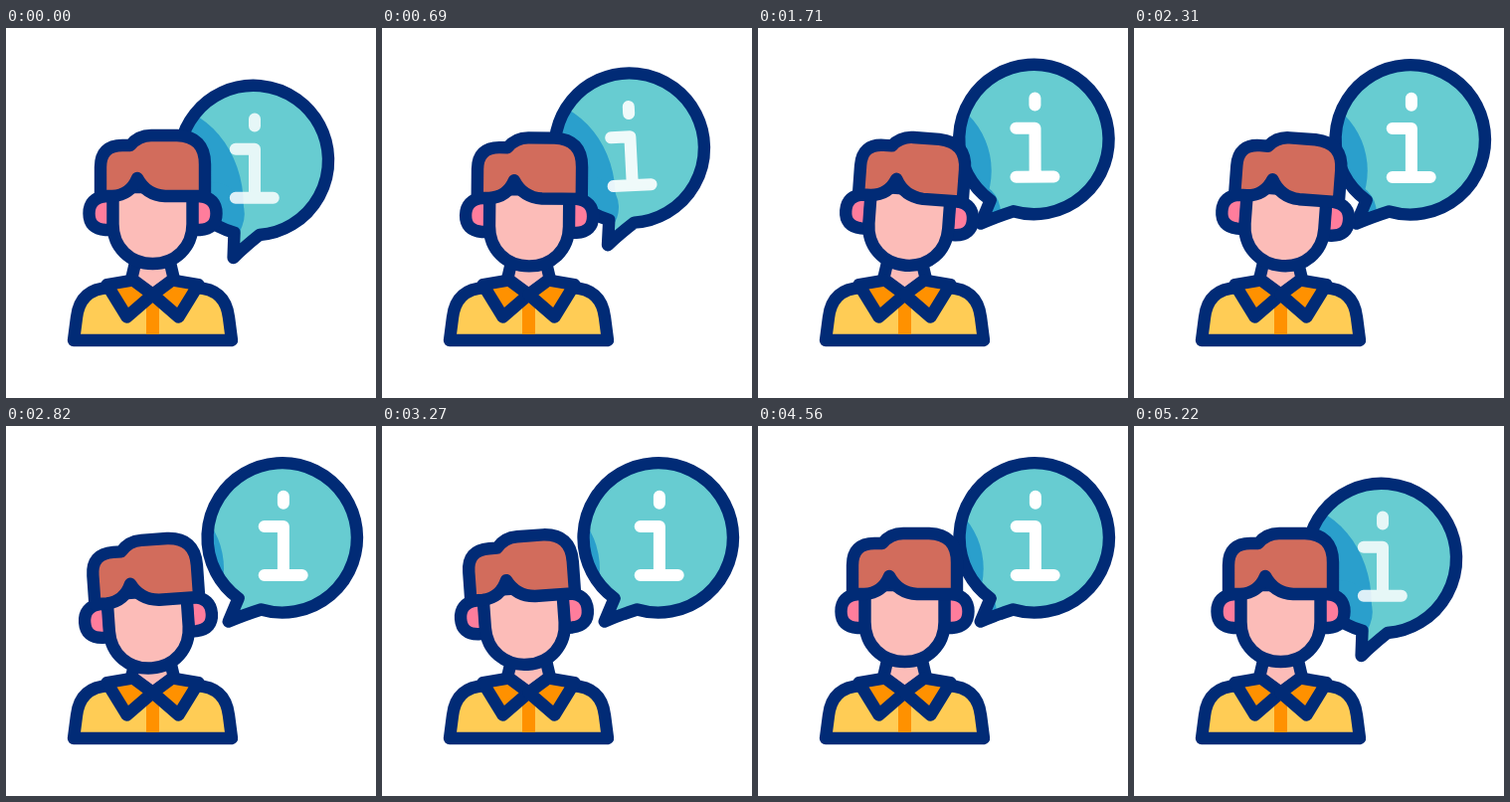
Write an HTML page that moves like this. It is 372 px wide and 372 px high and loops after 5280 ms.

```html
<!DOCTYPE html>
<html>
<head>
<meta charset="utf-8">
<style>
  html, body { margin: 0; height: 100%; overflow: hidden; background: #fff; }
  svg { display: block; width: 100vw; height: 100vh; }
  .line { stroke: #012b76; stroke-width: 12.4; stroke-linejoin: round; stroke-linecap: round; }
</style>
</head>
<body>
<svg viewBox="0 0 372 372" fill="none">
  <defs>
    <path id="balloon" d="M6 75A75.200 75.200 0 1 0 -19.300 72.700L-20.200 98Q-9 87 6 75Z"/>
    <clipPath id="inside"><use id="clipShape" href="#balloon"/></clipPath>
    <path id="ear" d="M108 169H100Q83.500 171 83.500 186.500T100 203H108Z"/>
    <path id="collar" d="M101.500 258L128 253.500L147.500 268L121.500 290.500Z"/>
  </defs>

  <g id="bubble">
    <g clip-path="url(#inside)">
      <circle r="110" fill="#67ccd1"/>
      <g fill="#2a9fcc">
        <ellipse id="headShade"/>
        <circle id="earShade" r="32"/>
      </g>
    </g>
    <use id="rim" href="#balloon" class="line"/>
    <path id="info" d="M1.200 -41.500V-34.500M-18 -11.200H1.200V37.700M-18 37.700H20"
      stroke="#fff" stroke-width="12" stroke-linecap="round" stroke-linejoin="round"/>
  </g>

  <path class="line" fill="#ffcc55" d="M68 314L71 291C73 274 82 262 104 261L147.500 268L191 261C213 262 222 274 224 291L227 314Z"/>
  <path fill="#ff9100" d="M141 270h13v38h-13z"/>
  <path class="line" fill="#fcbcb8" d="M130 236L126 253L147.500 268L169 253L165 236"/>
  <g class="line" fill="#ff9100">
    <use href="#collar"/>
    <use href="#collar" transform="matrix(-1 0 0 1 295 0)"/>
  </g>

  <g id="head" class="line">
    <g fill="#ff7d9c">
      <use href="#ear"/>
      <use href="#ear" transform="matrix(-1 0 0 1 295 0)"/>
    </g>
    <path fill="#fcbcb8" d="M107.500 160V197C107.500 221 125 237 147.500 237S187.500 221 187.500 197V160Z"/>
    <path fill="#d26c5c" d="M95 169V140Q95 118 117 118H125Q133 108 146 108H172Q200 109 200 137V169H160Q141 168 132 151Q125 168 107 169Z"/>
  </g>
</svg>
<script>
const LOOP = 5280;
const $ = id => document.getElementById(id);
const set = (id, attrs) => {
  for (const name in attrs) $(id).setAttribute(name, attrs[name]);
};
const mix = (a, b, k) => a + (b - a) * k;
const ease = (t, from, to) => {
  const u = Math.min(1, Math.max(0, (t - from) / (to - from)));
  return u * u * (3 - 2 * u);
};
const bezier = (a, b, c, d, k) => {
  const j = 1 - k;
  return j * j * j * a + 3 * j * j * k * b + 3 * j * k * k * c + k * k * k * d;
};

function draw(t) {
  // Head: leans right, then left, then upright, with two nods on the way
  const lean = 4.5 * ease(t, 330, 1995) - 8.6 * ease(t, 2250, 2850) + 4.1 * ease(t, 3300, 4560);
  const nod = t > 345 && t < 3645 ? 3.2 * (1 - Math.cos((t - 345) / 1650 * 2 * Math.PI)) : 0;
  set('head', { transform: `translate(0 ${nod}) rotate(${lean} 147.5 250)` });

  // Bubble: swings out along an arc, returns in a straight line
  const back = t > 4700;
  const p = back ? 1 - ease(t, 4710, 5230) : ease(t, 280, 1800);
  const x = back ? mix(248.8, 277.7, p) : bezier(248.8, 244.4, 265.6, 277.7, p);
  const y = back ? mix(133, 112.3, p) : bezier(133, 106, 101, 112.3, p);
  const tilt = back ? 0 : -5.4 * Math.sin(Math.PI * p);
  set('bubble', { transform: `translate(${x} ${y}) rotate(${tilt})` });

  const turn = { transform: `rotate(${21 * p})` };
  set('rim', turn);
  set('clipShape', turn);
  set('headShade', {
    cx: mix(-95, -130, p) + 1.9 * lean, cy: mix(45, 31, p),
    rx: mix(85, 79, p), ry: mix(100, 79, p)
  });
  set('earShade', { cx: mix(-41, -70, p) + lean, cy: mix(54, 74, p) });
  set('info', { opacity: Math.min(1, 0.84 + 0.32 * p) });
}

function tick() {
  draw(performance.now() % LOOP);
  requestAnimationFrame(tick);
}
tick();
</script>
</body>
</html>
```
